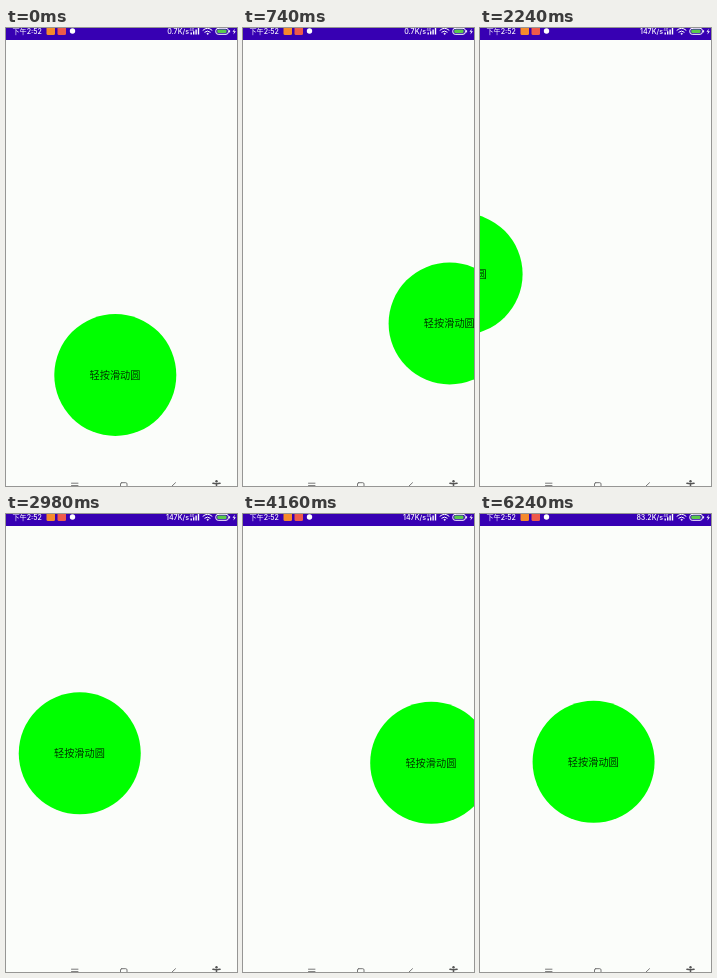
An HTML page that plays this animation: 231 by 458 pixels, repeating every 7040 ms.

```html
<!DOCTYPE html>
<html lang="zh">
<head>
<meta charset="utf-8">
<title>轻按滑动圆</title>
<style>
  html, body { margin: 0; height: 100%; overflow: hidden; background: #fbfdfa; }
  svg { display: block; width: 100%; height: 100%; }
  .status { font: 500 7.1px Inter, "Noto Sans CJK SC", "Noto Sans CJK", sans-serif; fill: #fff; }
  .tiny { font-size: 3.4px; }
  .label { font: 10.2px "Noto Sans CJK SC", "Noto Sans CJK", sans-serif; fill: #000; fill-opacity: .8; }
  .line { fill: none; stroke-width: 1; stroke-linecap: round; }
</style>
</head>
<body>
<svg viewBox="0 0 231 458">
  <rect width="231" height="458" fill="#fbfdfa"/>
  <rect width="231" height="12" fill="#3700b3"/>

  <g class="status">
    <text x="6.5" y="6.2">下午2:52</text>
    <rect x="40.5" y="-1.5" width="8.5" height="8.5" rx="1.5" fill="#f58a2c"/>
    <rect x="51.5" y="-1.5" width="8.5" height="8.5" rx="1.5" fill="#ee5a4a"/>
    <circle cx="66.5" cy="3" r="2.7"/>
    <text id="speed" x="183" y="6.2" text-anchor="end"></text>
    <text class="tiny" x="183.5" y="2.6">4G</text>
    <path d="M184.5 6.5v-2h1.4v2zM187 6.5v-3.2h1.4v3.2zM189.4 6.5v-5h1.4v5zM191.8 6.5v-7h1.4v7z"/>
    <path d="M228.8 .8l-2.3 3h1.6l-.7 2.7 2.5-3.3h-1.7z"/>
  </g>
  <g class="line" stroke="#fff">
    <path d="M197 2.2q4.5-4 9 0M198.8 4.1q2.7-2.3 5.4 0"/>
    <circle cx="201.5" cy="5.8" r=".5"/>
    <rect x="209.8" y=".3" width="12.6" height="6" rx="2.4"/>
    <path d="M223.6 2.6v1.4"/>
  </g>
  <rect x="211.2" y="1.6" width="9.4" height="3.4" rx="1.2" fill="#59c94c"/>

  <g id="ball">
    <circle r="61" fill="#0f0"/>
    <text class="label" x="-.3" y="3.8" text-anchor="middle">轻按滑动圆</text>
  </g>

  <g class="line" stroke="#777">
    <path d="M65.5 455.2h6.5M65.5 457.6h6.5"/>
    <rect x="114.5" y="454.7" width="6.5" height="6.5" rx="1.2"/>
    <path d="M169.5 454.7l-4.2 4"/>
    <path d="M207 455.3q3.5 .9 7 0M210.5 455.5v3" stroke="#555" stroke-width="1.5"/>
  </g>
  <circle cx="210.5" cy="453.2" r="1.2" fill="#555"/>
</svg>
<script>
  const LOOP = 7040;
  const STEP = 148.5; // the screen refreshes about seven times a second

  // Turning points and rests of the drag: [refresh, centre x, centre y]
  const path = [
    [0, 109.3, 347], [3, 196.4, 322], [5, 211, 262], [8, 97.8, 188.5],
    [10, 33, 220], [12, 33, 220], [15, -18.4, 246], [18, -18.4, 244],
    [21, 106, 238], [23, 106, 238], [24, 167, 234.5], [27, 204, 249],
    [31, 102.8, 248], [35, 113.6, 247.8]
  ];

  const ball = document.getElementById("ball");
  const speed = document.getElementById("speed");

  const slope = (i, axis) =>
    path[i] && path[i + 1]
      ? (path[i + 1][axis] - path[i][axis]) / (path[i + 1][0] - path[i][0])
      : 0;

  // Harmonic mean of neighbouring slopes: smooth, without overshoot at rests
  function tangent(i, axis) {
    const a = slope(i - 1, axis), b = slope(i, axis);
    return a * b > 0 ? 2 * a * b / (a + b) : 0;
  }

  function position(n, axis) {
    const i = path.findLastIndex(([start]) => start <= n);
    if (i === path.length - 1) return path[i][axis];
    const span = path[i + 1][0] - path[i][0];
    const u = (n - path[i][0]) / span, v = 1 - u;
    return v * v * (1 + 2 * u) * path[i][axis]
      + u * u * (1 + 2 * v) * path[i + 1][axis]
      + span * u * v * (v * tangent(i, axis) - u * tangent(i + 1, axis));
  }

  function draw(time) {
    const n = Math.floor(time % LOOP / STEP);
    ball.setAttribute("transform", `translate(${position(n, 1)} ${position(n, 2)})`);
    speed.textContent = n < 13 ? "0.7K/s" : n < 42 ? "147K/s" : "83.2K/s";
  }

  const origin = performance.now();
  function tick() {
    draw(performance.now() - origin);
    requestAnimationFrame(tick);
  }
  tick();
</script>
</body>
</html>
```
